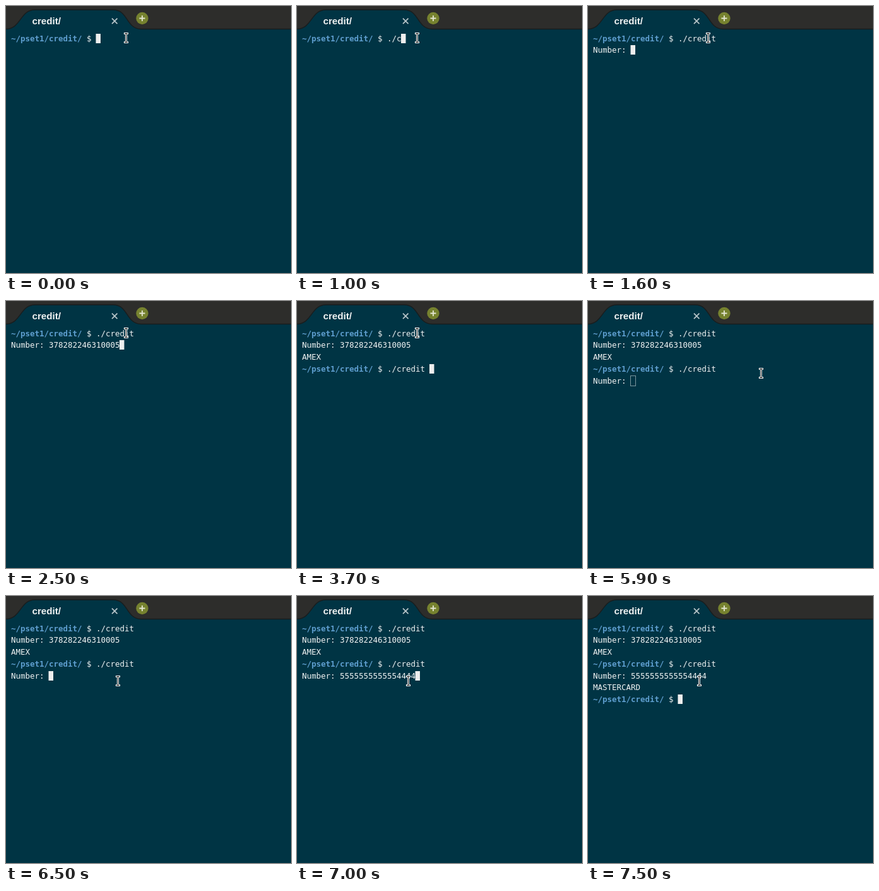
Recreate the animation shown at these times as an HTML page with a canvas. Size 452 by 423 pixels, loop 8 s.

```html
<!DOCTYPE html>
<html lang="en">
<head>
<meta charset="utf-8">
<title>Terminal</title>
<style>
html, body { margin: 0; width: 100%; height: 100%; overflow: hidden; background: #003444; }
canvas { display: block; }
</style>
</head>
<body>
<canvas id="stage" width="452" height="423"></canvas>
<script>
const ctx = document.getElementById("stage").getContext("2d");
const LOOP = 8000, LEFT = 8, CHAR = 7.5, LINE = 18.75;
const MONO = '12.46px "DejaVu Sans Mono", monospace';
const PATH = "~/pset1/credit/", PROMPT = PATH + " $ ";

// [time, text appended to the terminal]
const output = [
  [0, PROMPT], [700, "."], [800, "/"], [1000, "c"], [1300, "redit "],
  [1600, "\nNumber: "], [2500, "378282246310005"],
  [3100, "\nAMEX\n" + PROMPT], [3700, "./credit "],
  [4300, "\nNumber: "], [6800, "5555555555554444"],
  [7400, "\nMASTERCARD\n"], [7500, PROMPT]
];

// [time, x, y]; no position while the pointer is outside
const pointer = [
  [0, 190.5, 50.5], [4400, 218.5, 48.5], [4500], [5900, 274.5, 114.5],
  [6100, 205.5, 138.5], [6200, 175.5, 135.5], [6400, 176.5, 135.5],
  [6500, 177.5, 134.5], [7000, 176.5, 134.5]
];

function stroke(path, color, width, cap = "butt") {
  ctx.strokeStyle = color;
  ctx.lineWidth = width;
  ctx.lineCap = cap;
  ctx.stroke(new Path2D(path));
}

function text(str, x, y, color, font) {
  ctx.fillStyle = color;
  ctx.font = font;
  ctx.fillText(str, x, y);
}

function drawTabs() {
  ctx.fillStyle = "#2d2d2b";
  ctx.fillRect(0, 0, 452, 37);
  const tab = "M0 36.5C24 36 22 6 46 6H170C194 6 190 36 214 36.5";
  ctx.fillStyle = "#003444";
  ctx.fill(new Path2D(tab + "V38H0Z"));
  stroke(tab + "H452", "#191d1e", 1.5);
  text("credit/", 41.5, 28.5, "#f0f2f2", 'bold 15.2px "Liberation Sans", sans-serif');
  stroke("M168 19.7L176.5 28.2M176.5 19.7L168 28.2", "#b9c6ca", 1.7);
  ctx.fillStyle = "#76822f";
  ctx.beginPath();
  ctx.arc(216, 19.5, 9.7, 0, 2 * Math.PI);
  ctx.fill();
  stroke("M211.5 19.5H220.5M216 15V24", "#e4e6d2", 1.8);
}

function drawTerminal(t) {
  const lines = output.filter(e => e[0] <= t).map(e => e[1]).join("").split("\n");
  lines.forEach((line, row) => {
    const y = 56 + Math.floor(row * LINE);
    const start = line.startsWith(PATH) ? PATH.length : 0;
    if (start) text(PATH, LEFT, y, "#5f9fd0", "bold " + MONO);
    text(line.slice(start), LEFT + start * CHAR, y, "#f2f4f4", MONO);
  });
  const row = lines.length - 1;
  const x = LEFT - 0.5 + lines[row].length * CHAR, y = 44 + Math.floor(row * LINE);
  if (t >= 5400 && t < 6100) {
    ctx.strokeStyle = "#7b969e";
    ctx.lineWidth = 1;
    ctx.strokeRect(x, y - 0.5, 8, 16);
  } else {
    ctx.fillStyle = "#eeeeee";
    ctx.fillRect(x, y, CHAR, 15);
  }
}

function drawPointer(t) {
  const [, x, y] = pointer.filter(p => p[0] <= t).pop();
  if (x === undefined) return;
  const beam = `M${x - 2} ${y - 7}h4M${x} ${y - 7}v14M${x - 2} ${y + 7}h4`;
  stroke(beam, "#fff", 3, "square");
  stroke(beam, "#111", 1, "square");
}

function frame(now) {
  const t = now % LOOP;
  ctx.fillStyle = "#003444";
  ctx.fillRect(0, 0, 452, 423);
  drawTabs();
  drawTerminal(t);
  drawPointer(t);
  requestAnimationFrame(frame);
}
frame(performance.now());
</script>
</body>
</html>
```
